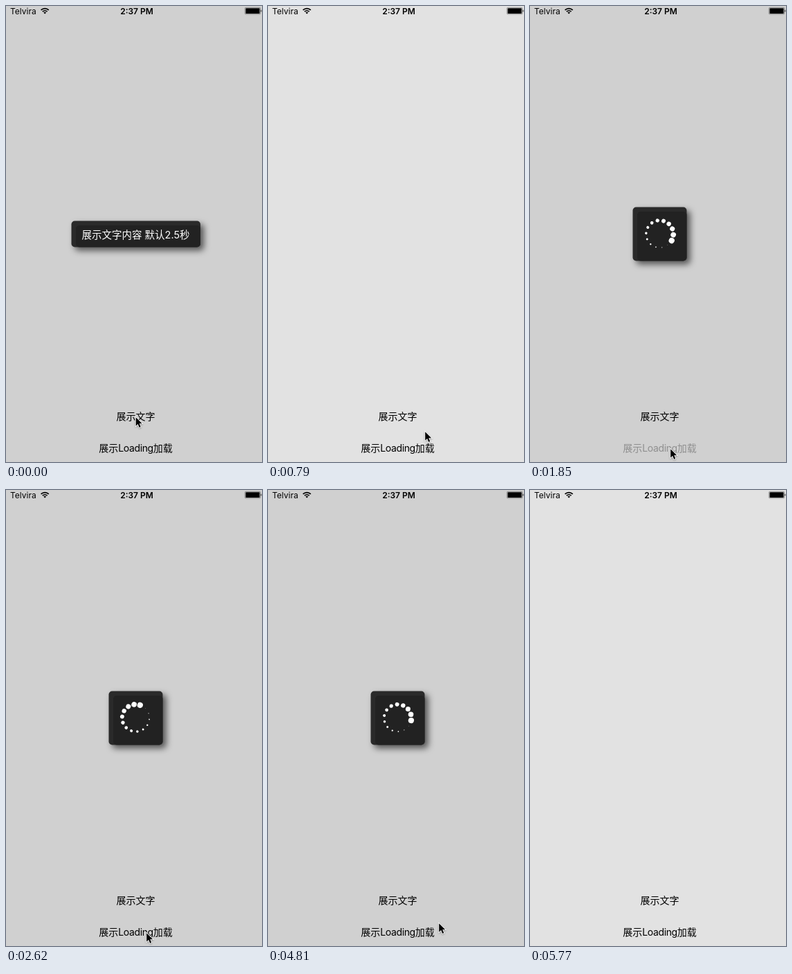
These frames come from a looping animation (370 by 661 pixels, 6410 ms). An HTML page:

```html
<!DOCTYPE html>
<html lang="zh">
<head>
<meta charset="utf-8">
<style>
html, body { margin: 0; width: 100%; height: 100%; overflow: hidden; background: #e2e2e2; }
svg { display: block; width: 370px; height: 661px; }
text { font: 14px Inter, "Noto Sans CJK SC", "Noto Sans CJK", sans-serif; }
.mid { text-anchor: middle; }
.status { font-size: 12px; }
.bold { font-weight: 600; }
.tight { letter-spacing: -.35px; }
.plate { fill: #2a2a2a; filter: drop-shadow(5px 5px 5px rgba(0, 0, 0, .6)); }
.inner { fill: #222; }
#toast text { font-size: 14.5px; fill: #fff; }
#arrow { filter: drop-shadow(0 1px 1px rgba(0, 0, 0, .3)); }
</style>
</head>
<body>
<svg viewBox="0 0 370 661">
  <rect id="bg" width="370" height="661"/>

  <text class="status" x="6" y="11.5">Telvira</text>
  <g fill="none" stroke="#000" stroke-width="1.7">
    <path d="M50.6 5.9a8 8 0 0 1 11.2 0M52.8 8.2a4.9 4.9 0 0 1 6.8 0"/>
    <path d="M54.3 9.6a2.7 2.7 0 0 1 3.8 0L56.2 11.6z" fill="#000" stroke="none"/>
  </g>
  <text class="status bold mid" x="189" y="11.5">2:37 PM</text>
  <rect x="345.3" y="2.3" width="22.4" height="9.6" rx="1.5" fill="none" stroke="#000" stroke-width=".6" stroke-opacity=".6"/>
  <rect x="346.4" y="3.3" width="20.2" height="7.6" rx=".6"/>
  <path d="M368.4 5.2q1.8 1.9 0 3.8z"/>

  <text class="mid" x="187.5" y="600">展示文字</text>
  <text class="mid" id="load" x="187.5" y="646">展示<tspan class="tight">Loading</tspan>加载</text>

  <g id="toast">
    <rect class="plate" x="94.5" y="311.5" width="186.5" height="38" rx="5"/>
    <rect class="inner" x="101" y="318" width="180" height="31.5" rx="5"/>
    <text class="mid" x="187.5" y="337">展示文字内容 默认2.5秒</text>
  </g>

  <g id="loader">
    <rect class="plate" x="148.5" y="291.5" width="78" height="78" rx="5"/>
    <rect class="inner" x="155" y="298" width="71.5" height="71.5" rx="5"/>
    <g id="dots" fill="#fff"></g>
  </g>

  <path id="arrow" d="M.7 1.2v12.6l2.9-2.8 2.1 4.9 2-.8-2-4.8h4z" stroke="#fff" stroke-width="1.6" paint-order="stroke"/>
</svg>
<script>
const LOOP = 6410, DOTS = 14;
const $ = id => document.getElementById(id);

// keys are rows of [step, value, value...]
const cursorKeys = [
  [2, 187, 595], [3, 195, 582], [4, 207, 575], [5, 220, 598], [6, 226.5, 616],
  [12, 226.5, 616], [16, 202.5, 641], [42, 202.5, 641], [46, 229, 634],
  [54, 230, 633], [55, 246.5, 627], [62, 318, 613], [65, 375, 605]
];
const spinKeys = [[22, -240.9], [30, 18.7], [41, 375.7], [55, 820.3], [66, 1170]];
const inkKeys = [[22, 143], [27, 0]];

function at(keys, n) {
  const i = keys.findIndex(k => k[0] >= n);
  if (i < 0) return keys[keys.length - 1].slice(1);
  if (!i) return keys[0].slice(1);
  const a = keys[i - 1], b = keys[i], p = (n - a[0]) / (b[0] - a[0]);
  return a.slice(1).map((v, j) => v + (b[j + 1] - v) * p);
}

for (let i = 0; i < DOTS; i++) {
  const a = -i * 2 * Math.PI / DOTS;
  const dot = document.createElementNS("http://www.w3.org/2000/svg", "circle");
  dot.setAttribute("cx", 19.7 * Math.sin(a));
  dot.setAttribute("cy", -19.7 * Math.cos(a));
  dot.setAttribute("r", 4.1 * (1 - i / DOTS));
  $("dots").append(dot);
}

const show = (id, on) => $(id).setAttribute("visibility", on ? "visible" : "hidden");

function draw(now) {
  const t = now % LOOP;
  // the screen refreshes in steps of about 87 ms
  const n = Math.floor(t < 1900 ? t / 87.7 : (t + 14) / 87.4);
  const toast = n < 9, loader = n > 20 && n < 65;
  show("toast", toast);
  show("loader", loader);
  $("bg").setAttribute("fill", toast || loader ? "#d0d0d0" : "#e2e2e2");

  const ink = n < 20 ? 0 : at(inkKeys, n)[0];
  $("load").setAttribute("fill", `rgb(${ink},${ink},${ink})`);
  $("dots").setAttribute("transform", `translate(187.5 330.5) rotate(${at(spinKeys, n)[0]})`);
  $("arrow").setAttribute("transform", `translate(${at(cursorKeys, n)})`);
  requestAnimationFrame(draw);
}
draw(performance.now());
</script>
</body>
</html>
```
